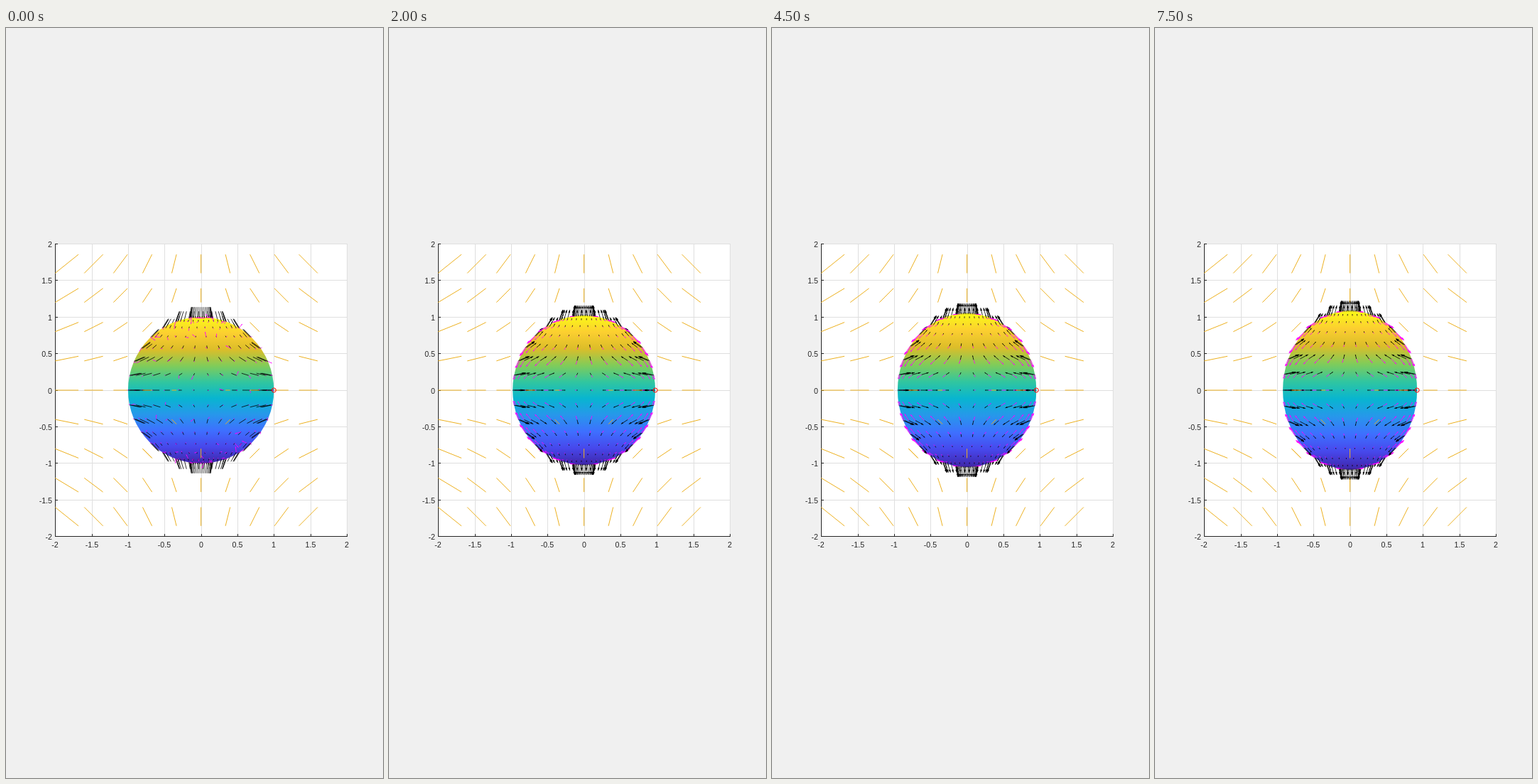
Animation of 531x1054 px, one loop 8000 ms. Source, as an HTML page with a canvas:

```html
<!DOCTYPE html>
<html lang="en">
<head>
<meta charset="utf-8">
<title>Sphere in a strain field</title>
<style>
html, body { margin: 0; width: 100%; height: 100%; overflow: hidden; background: #f0f0f0; }
canvas { display: block; }
</style>
</head>
<body>
<canvas id="stage" width="531" height="1054"></canvas>
<script>
const ctx = document.getElementById('stage').getContext('2d');
const STEP = 500, STEPS = 16;
const CX = 274.6, CY = 509, SX = 102.7, SY = 102.8;
const AMP = 0.15, FIELD = 0.16, AZIMUTHS = 30;
const BLACK = '#000', PINK = '#f0f', GOLD = '#edb120', INK = '#262626';

// Gauss-Legendre heights of the latitude rings
const HALF = [0.2012, 0.3942, 0.5710, 0.7244, 0.8482, 0.9373, 0.9880];
const RINGS = [...HALF.map(z => -z).reverse(), 0, ...HALF];

// Parula, evenly spaced
const PARULA = [
  '#3e26a8', '#4747eb', '#3e6fff', '#2797eb', '#08b5d0',
  '#31c69f', '#81cc59', '#dcbd29', '#fccf30', '#f9fb15'
];

const px = x => CX + x * SX;
const py = z => CY - z * SY;

function random(seed) {
  const v = Math.sin(seed * 12.9898 + 4.1) * 43758.5453;
  return v - Math.floor(v);
}

function line(x1, y1, x2, y2, color, width) {
  ctx.strokeStyle = color;
  ctx.lineWidth = width;
  ctx.beginPath();
  ctx.moveTo(x1, y1);
  ctx.lineTo(x2, y2);
  ctx.stroke();
}

function arrow(x, z, u, w, color, width, head) {
  const x1 = px(x), y1 = py(z), dx = u * SX, dy = -w * SY;
  const x2 = x1 + dx, y2 = y1 + dy;
  line(x1, y1, x2, y2, color, width);
  if (!head) return;
  ctx.fillStyle = color;
  ctx.beginPath();
  ctx.moveTo(x2, y2);
  for (const s of [1, -1]) {
    ctx.lineTo(x2 - dx * 0.27 + s * dy * 0.09, y2 - dy * 0.27 - s * dx * 0.09);
  }
  ctx.fill();
}

function axes() {
  ctx.fillStyle = '#f0f0f0';
  ctx.fillRect(0, 0, 531, 1054);
  ctx.fillStyle = '#fff';
  ctx.fillRect(69, 303, 411, 412);
  ctx.font = '10.67px "Liberation Sans", Arial, sans-serif';
  const ticks = [];
  for (let v = -2; v <= 2; v += 0.5) {
    ticks.push([v, Math.round(px(v)) + 0.5, Math.floor(py(v)) + 0.5]);
  }
  for (const [, x, y] of ticks) {
    line(x, 303, x, 715, '#dfdfdf', 1);
    line(69, y, 480, y, '#dfdfdf', 1);
  }
  line(69.5, 303, 69.5, 715, INK, 1);
  line(69, 714.5, 480, 714.5, INK, 1);
  for (const [v, x, y] of ticks) {
    line(x, 711, x, 715, INK, 1);
    line(69, y, 73, y, INK, 1);
    ctx.fillStyle = INK;
    ctx.textAlign = 'center';
    ctx.fillText(v, x - 0.5, 729.5);
    ctx.textAlign = 'right';
    ctx.fillText(v, 65, y + 4);
  }
}

function field(visible) {
  for (let i = -5; i <= 4; i++) {
    for (let j = -4; j <= 4; j++) {
      if (!visible(i, j)) continue;
      const x = i * 0.4, z = j * 0.4;
      arrow(x, z, -x * FIELD, z * FIELD, GOLD, 1, false);
    }
  }
}

const inFront = (i, j) =>
  Math.abs(i) <= 2 && (j === 0 || j === -1 && Math.abs(i) === 1 ||
  j === -2 && i % 2 === 0);

// Share of a near-side arrow that stays above the surface
function exposed(z, c) {
  const h = Math.abs(z);
  if (h < 0.5) return 1;
  const low = h < 0.65 ? 0.45 : 0.16;
  return low + (1 - low) * Math.pow(c, 8);
}

function forces(front, n, a, b) {
  RINGS.forEach((z, row) => {
    const r = Math.sqrt(1 - z * z);
    for (let k = 0; k < AZIMUTHS; k++) {
      const isFront = k <= AZIMUTHS / 2;
      if (isFront !== front) continue;
      const c = Math.cos(k * 2 * Math.PI / AZIMUTHS), x = r * c;
      const m = AMP * (front ? exposed(z, c) : 1);
      arrow(x * a, z * b, -x * m, z * m, BLACK, 0.8, n > 0);
      if (n > 0) {
        const q = x * x - z * z;
        arrow(x * a, z * b, (x - x * q) * m, (-z - z * q) * m, PINK, 0.8, true);
      } else {
        const seed = row * AZIMUTHS + k + 1;
        const len = 0.012 + 0.075 * Math.pow(random(seed), 5);
        const dir = random(seed + 700) * 2 * Math.PI;
        arrow(x, z, len * Math.cos(dir), len * Math.sin(dir), PINK, 0.8, true);
      }
    }
  });
}

function body(a, b) {
  const shade = ctx.createLinearGradient(0, py(-b), 0, py(b));
  PARULA.forEach((color, i) => shade.addColorStop(i / (PARULA.length - 1), color));
  ctx.fillStyle = shade;
  ctx.beginPath();
  ctx.ellipse(CX, CY, a * SX, b * SY, 0, 0, 2 * Math.PI);
  ctx.fill();
}

function marker(a) {
  ctx.strokeStyle = '#f00';
  ctx.lineWidth = 1;
  ctx.beginPath();
  ctx.arc(px(a), CY, 3, 0, 2 * Math.PI);
  ctx.stroke();
}

function draw(n) {
  const a = Math.exp(-0.0055 * n), b = 1 / a;
  axes();
  field(() => true);
  forces(false, n, a, b);
  body(a, b);
  forces(true, n, a, b);
  field(inFront);
  marker(a);
}

let shown = -1;
const start = performance.now();
function tick() {
  const n = Math.floor((performance.now() - start) / STEP) % STEPS;
  if (n !== shown) draw(shown = n);
  requestAnimationFrame(tick);
}
tick();
</script>
</body>
</html>
```
